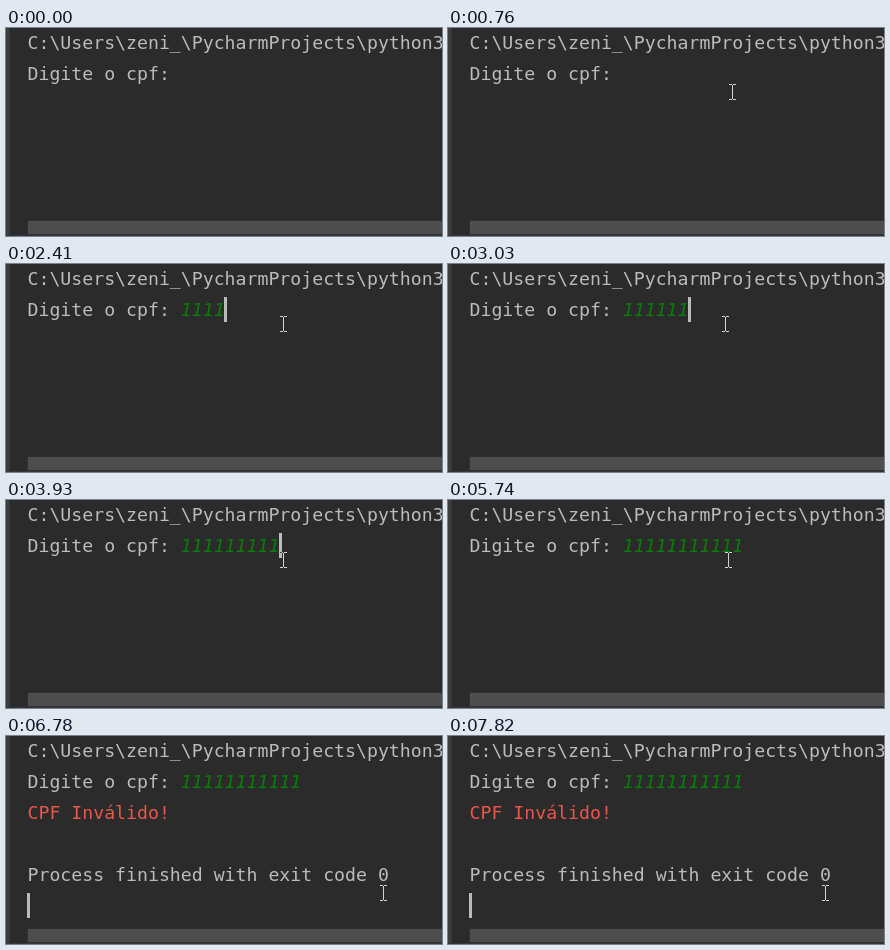
Write an HTML page that moves like this. It is 436 by 208 pixels and loops after 8000 ms.

```html
<!DOCTYPE html>
<html lang="pt">
<head>
<meta charset="utf-8">
<title>Console</title>
<style>
  html, body { margin: 0; width: 100%; height: 100%; overflow: hidden; background: #2b2b2b; }
  svg { display: block; width: 436px; height: 208px; }
  text { font: 18.19px "DejaVu Sans Mono", "Noto Sans Mono", monospace; fill: #bbbbbb; white-space: pre; }
  #typed { font-style: italic; fill: #087d08; }
  #error { fill: #ea564c; }
  #mouse { fill: #ffffff; mix-blend-mode: difference; }
  rect { shape-rendering: crispEdges; }
</style>
</head>
<body>
<svg viewBox="0 0 436 208">
  <rect width="436" height="208" fill="#2b2b2b"/>
  <rect width="3" height="208" fill="#3c3f41"/>
  <rect x="3" width="1" height="208" fill="#323435"/>
  <rect x="21" y="192" width="415" height="15" fill="#303030"/>
  <rect x="22" y="193" width="414" height="13" fill="#4d4d4d"/>
  <rect y="207" width="436" height="1" fill="#353739"/>
  <text x="21.5" y="21">C:\Users\zeni_\PycharmProjects\python3</text>
  <text x="21.5" y="52">Digite o cpf: </text>
  <text id="typed" x="174.8" y="52"></text>
  <g id="output">
    <text id="error" x="21.5" y="83">CPF Inválido!</text>
    <text x="21.5" y="145">Process finished with exit code 0</text>
  </g>
  <rect id="caret" width="3" height="25" fill="#bbbbbb"/>
  <g id="mouse">
    <rect x="-3" y="-8" width="3" height="1"/>
    <rect x="1" y="-8" width="3" height="1"/>
    <rect x="0" y="-7" width="1" height="14"/>
    <rect x="-3" y="7" width="3" height="1"/>
    <rect x="1" y="7" width="3" height="1"/>
  </g>
</svg>
<script>
  const LOOP = 8000, STEP = 70, LEFT = 21.5, ADVANCE = 10.95, LINE = 31;
  const ENTER = 6580, RESULT = 6780;
  const keys = [1390, 1650, 1930, 2410, 2750, 3030, 3450, 3730, 3930, 4680, 5110];
  const blinks = [[0, 1250], [5740, 6230], [7330, 7820]];

  // start, end, from, to, easing
  const moves = [
    [340, 830, [424, 111], [281, 63], p => 1 - (1 - p) ** 2],
    [970, 1040, [279, 63], [278, 63], p => p],
    [1250, 1250, [277, 60], [277, 60], p => p],
    [5740, 6300, [280, 60], [377, 157], p => p * p * (3 - 2 * p)]
  ];

  const $ = id => document.getElementById(id);
  const typed = $("typed"), output = $("output"), caret = $("caret"), mouse = $("mouse");
  const show = (el, on) => el.setAttribute("visibility", on ? "visible" : "hidden");

  function mouseAt(t) {
    const move = moves.filter(m => t >= m[0]).pop();
    if (!move) return null;
    const [start, end, from, to, ease] = move;
    const passed = Math.floor((t - start) / STEP) * STEP;
    const p = end > start ? ease(Math.min(1, passed / (end - start))) : 1;
    return from.map((v, i) => Math.round(v + (to[i] - v) * p));
  }

  function draw(t) {
    const count = keys.filter(k => t >= k).length;
    const text = "1".repeat(count);
    if (typed.textContent !== text) typed.textContent = text;

    show(output, t >= RESULT);

    const row = t >= RESULT ? 5 : t >= ENTER ? 2 : 1;
    const col = row === 1 ? 14 + count : 0;
    caret.setAttribute("x", Math.floor(LEFT + col * ADVANCE));
    caret.setAttribute("y", 2 + row * LINE);
    show(caret, !blinks.some(([a, b]) => t >= a && t < b));

    const pos = mouseAt(t);
    show(mouse, pos);
    if (pos) mouse.setAttribute("transform", `translate(${pos})`);
  }

  const begin = performance.now();
  function tick() {
    draw((performance.now() - begin) % LOOP);
    requestAnimationFrame(tick);
  }
  tick();
</script>
</body>
</html>
```
